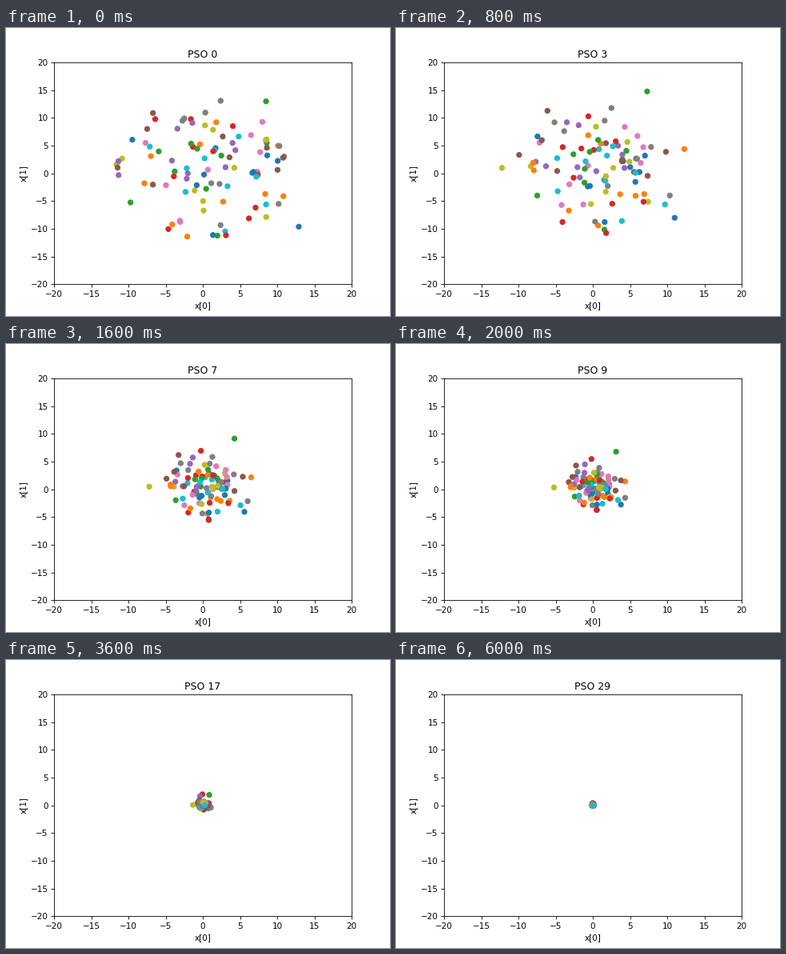
Write a matplotlib script that moves like this. It is 480 px wide and 360 px high and loops after 6200 ms.

```python
import numpy as np
import matplotlib.pyplot as plt
from matplotlib.animation import FuncAnimation

STEPS = 30
COUNT = 100
FAST = 0.6  # decay of the initial velocity

# The outermost particle of each colour:
# x, y at the start, x, y after three steps, convergence rate.
LEADERS = np.array([
    (12.9, -9.6, 11.0, -8.0, .81),
    (10.1, 5.0, 12.3, 4.4, .80),
    (8.5, 13.0, 7.3, 14.8, .85),
    (-1.6, 9.8, -.6, 10.3, .88),
    (-1.4, 9.1, -1.9, 8.7, .88),
    (-6.7, 10.9, -6.1, 11.3, .82),
    (8.0, 9.3, 4.3, 8.4, .80),
    (2.4, 13.1, 2.5, 11.8, .80),
    (-11.6, 1.6, -12.2, 1.0, .84),
    (8.5, -5.6, 9.7, -5.6, .80),
])


def make_swarm():
    rng = np.random.default_rng(12)
    n = COUNT - len(LEADERS)
    radius = 12 * rng.random(n) ** .65
    angle = rng.uniform(0, 2 * np.pi, n)
    p0 = np.column_stack([radius * np.cos(angle), radius * np.sin(angle)])
    p3 = .8 * p0 + rng.normal(0, 1.3, (n, 2))
    rate = rng.uniform(.78, .84, n)
    return np.vstack([LEADERS, np.column_stack([p0, p3, rate])])


particles = make_swarm()
start, third, rate = particles[:, :2], particles[:, 2:4], particles[:, 4:]
# Damped motion: slow * rate**k + quick * FAST**k through both known places.
slow = (third - start * FAST ** 3) / (rate ** 3 - FAST ** 3)
quick = start - slow


def swarm(k):
    return slow * rate ** k + quick * FAST ** k


plt.rcParams["font.family"] = "DejaVu Sans"
fig, ax = plt.subplots(figsize=(6.4, 4.8), dpi=75)
ax.set(xlim=(-20, 20), ylim=(-20, 20), xlabel="x[0]", ylabel="x[1]")
colors = [f"C{n % 10}" for n in range(COUNT)]
dots = ax.scatter(*start.T, s=36, c=colors)
title = ax.set_title("PSO 0")


def draw(frame):
    k = max(frame - 1, 0)  # the first step is held twice
    dots.set_offsets(swarm(k))
    title.set_text(f"PSO {k}")
    return dots, title


anim = FuncAnimation(fig, draw, frames=STEPS + 1, interval=200,
                     repeat=True, repeat_delay=0)
plt.show()
```
